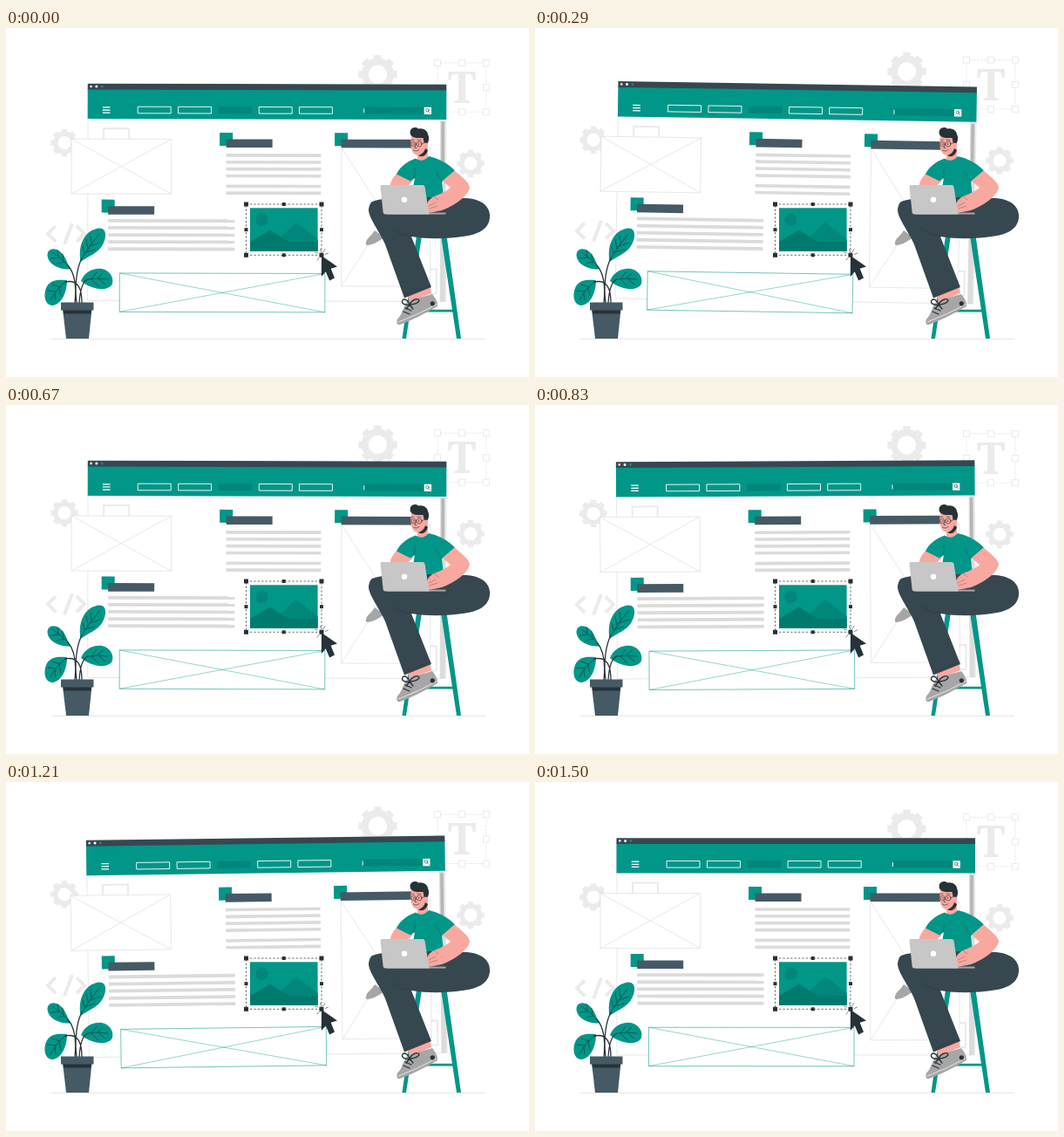
These frames come from a looping animation (600 by 400 pixels, 1540 ms). An HTML page:

```html
<!DOCTYPE html>
<html lang="en">
<head>
<meta charset="utf-8">
<title>Web page wireframe</title>
<style>
html, body { margin: 0; width: 100%; height: 100%; overflow: hidden; background: #fff; }
svg { display: block; width: 600px; height: 400px; }
.teal { fill: #009688; }
.deep { fill: #00877a; }
.slate { fill: #455a64; }
.navy { fill: #37474f; }
.ink { fill: #263238; }
.skin { fill: #f9a8a0; }
.line { fill: none; stroke: #263238; stroke-width: .6; stroke-linecap: round; stroke-linejoin: round; }
.pale { fill: none; stroke: #ebebeb; }
.wire { fill: #fff; stroke: #dedede; stroke-width: .7; }
.green { fill: #fff; stroke: #009688; stroke-width: .55; }
.white { fill: none; stroke: #fff; stroke-width: .9; }
.bold { stroke-width: 1.3; }
</style>
</head>
<body>
<svg viewBox="0 0 600 400">
  <defs>
    <g id="gear" class="pale">
      <circle r="14.6" stroke-width="8"/>
      <circle r="20" stroke-width="4.4" pathLength="16" stroke-dasharray="1.1 .9" stroke-dashoffset=".55"/>
    </g>
  </defs>

  <g id="icons">
    <use href="#gear" x="426.5" y="49.3"/>
    <use href="#gear" transform="translate(67 127.6) scale(.71)"/>
    <use href="#gear" transform="translate(533 151.4) scale(.71)"/>
    <path class="pale" stroke-width="4" d="M57 223L48 232L57 241M76 220L67 244M81 223L90 232L81 241"/>
    <rect class="pale" x="495" y="36" width="56" height="56.4" stroke-dasharray="3 1"/>
    <g id="handles" fill="#fff" stroke="#e6e6e6" stroke-width=".8"></g>
    <text x="523" y="82" font-size="50" font-weight="bold" font-family="'Noto Serif', serif" text-anchor="middle" fill="#ebebeb">T</text>
  </g>

  <path d="M52 356.3H550" stroke="#dcdcdc" stroke-width=".8"/>

  <g id="page">
    <rect class="wire" x="93.9" y="66" width="410.8" height="247"/>
    <rect class="teal" x="93.5" y="70" width="411.5" height="34.5"/>
    <rect class="navy" x="93.5" y="64.2" width="411.5" height="6.8"/>
    <circle cx="97.3" cy="67.5" r="1.4" fill="#dcdcdc"/>
    <circle cx="103.6" cy="67.5" r="1.5" fill="#fff"/>
    <circle cx="110" cy="67.5" r="1.4" class="teal"/>
    <path class="white bold" d="M110.7 91.3h8.6m-8.6 3.1h8.6m-8.6 3.1h8.6"/>
    <path class="white" d="M151 90.5h38v7.6h-38zM197.4 90.5h38v7.6h-38zM290 90.5h38v7.6h-38zM336.2 90.5h38v7.6h-38z"/>
    <path class="deep" d="M243.5 90.3h38.5v8h-38.5zM411 90.3h68v8h-68z"/>
    <path class="white" d="M410.5 92v5"/>
    <rect x="479.5" y="90.3" width="8.3" height="8.3" fill="#fff"/>
    <circle class="line" cx="483.2" cy="93.8" r="1.7"/>
    <path class="line" d="M484.5 95.1l1.8 1.8"/>
    <rect x="498" y="105" width="6" height="208" fill="#dcdcdc"/>
    <rect x="499.3" y="107" width="3.4" height="56" fill="#b5b5b5"/>
    <path class="pale" stroke-width="2" d="M112 115.5h29v29h-29zM465 276h29v28h-29z"/>
    <path class="wire" d="M75 127.5H189.5V190.5H75ZL189.5 190.5M75 190.5L189.5 127.5"/>
    <path class="wire" d="M384.8 137H487V295.8H384.8ZL487 295.8M384.8 295.8L487 137"/>
    <g id="labels"></g>
    <g id="copy" fill="#dbdbdb"></g>
    <rect class="green" x="130.5" y="281.3" width="235.6" height="44.4"/>
    <path class="green" stroke-opacity=".75" d="M130.5 281.3L366.1 325.7M130.5 325.7L366.1 281.3"/>
  </g>

  <g id="picture">
    <rect x="275.5" y="202" width="86.5" height="58.3" fill="#fff" stroke="#263238" stroke-width=".7" stroke-dasharray="2.4 2"/>
    <rect class="teal" x="280" y="206.3" width="77.6" height="49.5"/>
    <circle class="deep" cx="293.5" cy="219.8" r="7.2"/>
    <path class="deep" d="M308 246L333 223L357.6 242V256H308Z"/>
    <path fill="#007a6f" d="M280 245L303 231.5L324 245H357.6V255.8H280Z"/>
    <g id="grips" class="ink"></g>
    <path class="line" d="M357.5 258L354.5 257M359 263.5L357 266M364 256.5L366 253.5M366.5 259.5L369.5 258M361.5 256L360.5 253.5"/>
    <path class="ink" d="M362 261L380 273.5L372.7 275.7L377 286.5L371.2 289.5L366.8 279.3L361.8 285Z"/>
  </g>

  <g id="plant">
    <path class="teal" d="M85.500 268C82 248 91 231 107 229.500C117 229.500 115 242 110 250C104 259 95 261 85.500 268Z"/>
    <path class="teal" d="M73.500 276.500C61 277 48 271 47.500 260C48 251 58 252 63 257C69 263 70 269 73.500 276.500Z"/>
    <path class="teal" d="M86 290C90 280 99 275 110 276C120 278 125 288 121 295C115 302 98 300 86 290Z"/>
    <path class="teal" d="M70 289C70 303 64 317 53 318C43 317 43 303 47 296C53 287 62 289 70 289Z"/>
    <path class="line" d="M87 264Q97 248 107 236M90 258L88 250M94 253L92 242M98 247L97 238M91 257L102 254M96 250L108 246"/>
    <path class="line" d="M71 272Q62 262 53 257M66 266L65 259M60 261L59 255M67 268L58 270M61 263L52 264"/>
    <path class="line" d="M94 288Q106 286 117 288M98 288L104 280M105 287L111 281M98 288L106 296M106 287L114 294"/>
    <path class="line" d="M68 291Q57 300 51 312M62 297L53 294M57 302L48 301M61 298L63 307M56 304L57 312"/>
    <path class="line bold" d="M81 315C78 294 82 273 87 264M79 315C81 296 79 281 71 272M84 315C85 300 88 290 94 288M87 315C87 299 83 288 68 291"/>
    <path class="slate" d="M65 322H98.500L95 356H69Z"/>
    <path class="ink" d="M65.500 322H98L97.500 327.500H66Z"/>
    <rect class="slate" x="63" y="314.5" width="37.5" height="9"/>
  </g>

  <g id="designer">
    <path class="teal" d="M471 238H477L459 356H454.500ZM499 238H505.500L522 356H517ZM460 322.800H516V325.500H460Z"/>
    <path fill="#a6a6a6" d="M413 246C414 240 419 239 423 232L434 240C427 245 420 249 414 249Q412 248 413 246Z"/>
    <path class="skin" d="M449 166C443 172 440 178 441 183L452 189L467 175Z"/>
    <path class="skin" d="M458 300L486 293L488 304L463 314Z"/>
    <path class="navy" d="M420 199C432 194 446 196 466 195L465 188H500L507 195H528C546 196 556 205 555 217C554 231 541 237 524 239C503 242 484 242 465 239L488 297L457 309.500L435 248C428 232 416 218 416 208Q417 201 420 199Z"/>
    <path class="line" stroke-opacity=".6" d="M465 239Q450 237 442 229M458 306L486 295"/>
    <path class="skin" d="M472 140L484 134L484 149Q478 157 472 151Z"/>
    <path class="teal" d="M470 149.500C460 153 452 159 448 167.500L464 175.500L469 172L465 194H502L500 176L515 163.500C508 156 498 150 485 147Q478 155 470 149.500Z"/>
    <path class="line" stroke-opacity=".5" d="M468 173Q470 166 469 161M500 176L493 165"/>
    <path class="skin" d="M514.500 163.500C524 171 532 178 532 183C530 193 514 204 500 209L485 212C480 206 483 197 491 193C502 189 509 184 510 183L501 175.500Z"/>
    <path class="line" stroke-opacity=".5" d="M485 204L493 200M486 207L495 204M491 193L496 197"/>
    <rect x="437" y="211.600" width="67.500" height="2" fill="#a6a6a6"/>
    <path fill="#c7c7c7" d="M431 180H478Q480 180 480.500 182L485.500 213.500H435Q433 213.500 432.700 211.500L429.500 182Q429.500 180 431 180Z"/>
    <circle cx="457" cy="196.800" r="3.200" fill="#fff"/>

    <path class="skin" d="M465 123L482 122L484 136C483 143 479 147 473 146C466 145 463 139 465 123Z"/>
    <path class="ink" d="M473 146C477 145 480 142 481 138L484 140C482 146 478 149 473 146Z"/>
    <path class="ink" d="M464 122C462 115 469 112 473 115.500C479 114 484 118 484 122C486 125 485 131 483 133L479.500 131L478.500 126C474 126 467 127 464 122Z"/>
    <circle class="skin" cx="481.700" cy="133.800" r="2.400"/>
    <g class="line">
      <circle cx="467.500" cy="133" r="2.700"/>
      <circle cx="474" cy="133" r="3"/>
      <path d="M477 132.500L482 131M465.500 128.500L468 128M472 128L476 128.500M470 134L469 137.500L471 137.500"/>
    </g>
    <circle class="ink" cx="467.800" cy="133" r=".7"/>
    <circle class="ink" cx="473.600" cy="133" r=".7"/>
    <path class="line" d="M467.500 140Q470.500 142.500 474 139.500"/>

    <path fill="#a6a6a6" d="M449.500 333C455 328 456 318 461 313Q464 315 468 311L489 305C493 310 496 315 495 319C481 327 466 335 452 340C448 341 447.500 336 449.500 333Z"/>
    <path fill="none" stroke="#e6e6e6" d="M450 337Q472 329 494.500 316.500"/>
    <circle class="ink" cx="489.300" cy="315.800" r="2.600"/>
    <path class="line bold" d="M463 317C458 318 453 316 455 312C458 309 462 314 463 317C466 311 472 309 474 312C474 315 468 317 463 317L467 322M463 317L459 322M458 321L465 324M456 325L463 328"/>
  </g>
</svg>
<script>
const LOOP = 1540, LEAD = 45;
const byId = id => document.getElementById(id);
const rect = (x, y, w, h, cls = "") => `<rect class="${cls}" x="${x}" y="${y}" width="${w}" height="${h}"/>`;

// Small squares at the corners and edge midpoints of a box.
function markers(x, y, w, h, corner, middle) {
  let out = "";
  for (let i = 0; i < 3; i++) for (let j = 0; j < 3; j++) {
    if (i === 1 && j === 1) continue;
    const size = i === 1 || j === 1 ? middle : corner;
    out += rect(x + w * i / 2 - size / 2, y + h * j / 2 - size / 2, size, size);
  }
  return out;
}

byId("handles").innerHTML = markers(495, 36, 56, 56.4, 7, 7);
byId("grips").innerHTML = markers(275.5, 202, 86.5, 58.3, 5, 4);
byId("labels").innerHTML = [[245, 120, 53], [377, 120, 88], [109.7, 197, 53]]
  .map(([x, y, w]) => rect(x, y, 15, 15, "teal") + rect(x + 7.5, y + 7.5, w, 9.6, "slate")).join("");
byId("copy").innerHTML =
  [144.2, 152, 159.9, 167.8, 179.6, 187.4].map(y => rect(252.5, y, 108.8, 3.6)).join("") +
  [0, 1, 2, 3, 4].map(i => rect(117.3, 219.3 + i * 8.1, 145.2, 3.8)).join("");

// Linear swing from 1 to -1 and back over one turn.
const triangle = turn => 4 * Math.abs(turn % 1 - 0.5) - 1;

function draw() {
  const turn = (performance.now() + LEAD) / LOOP;
  byId("page").setAttribute("transform", `rotate(${triangle(turn + 0.75)} 297 195)`);
  byId("icons").setAttribute("transform", `translate(0 ${4.4 * triangle(turn)})`);
  requestAnimationFrame(draw);
}
draw();
</script>
</body>
</html>
```
